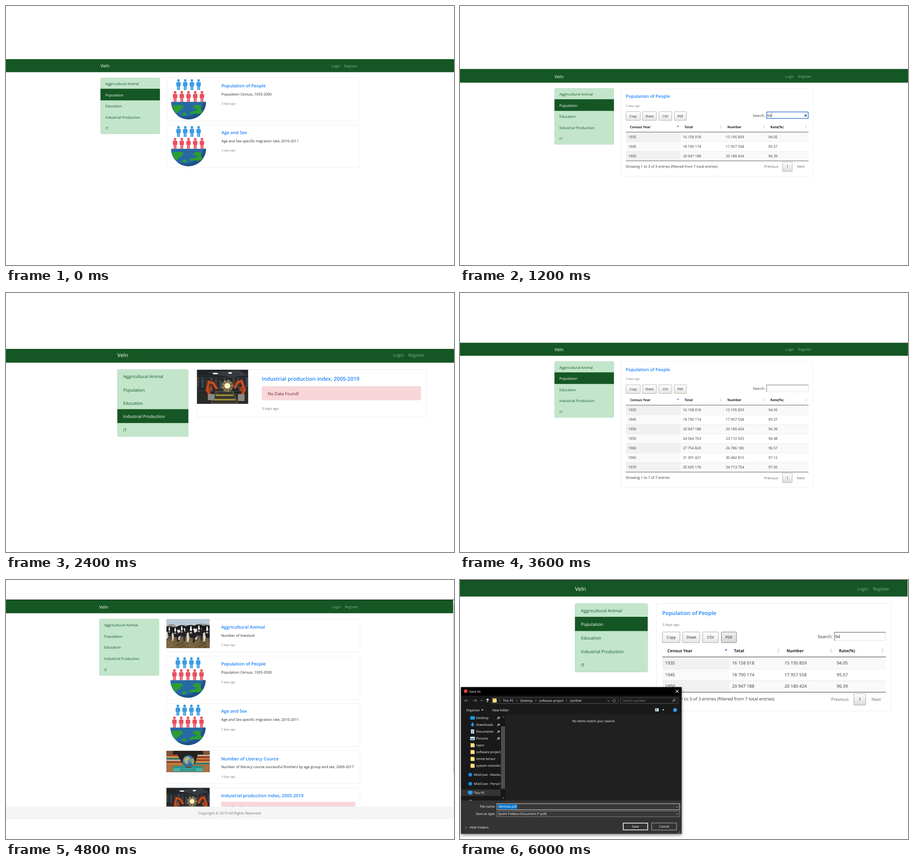
Recreate the animation shown at these times as an HTML page. Size 983 by 570 pixels, loop 7200 ms.

```html
<!DOCTYPE html>
<html lang="en">
<head>
<meta charset="utf-8">
<title>Statistics portal tour</title>
<style>
  html, body { margin: 0; width: 100%; height: 100%; overflow: hidden; background: #fff; }
  svg { display: block; }
  text { font-family: 'Open Sans', 'Noto Sans', sans-serif; white-space: pre; text-rendering: geometricPrecision; }
</style>
</head>
<body>
<svg id="stage" width="983" height="570" viewBox="0 0 983 570"></svg>
<script>
const SCENE_MS = 1200;
const GREEN = '#155724', INK = '#212529', MUTED = '#6c757d', LINK = '#1a80fa';
const BRAND = 'Veln';
const FIT = { 400: .957, 600: .945, 700: .915 };   // evens out width per weight

const rect = (x, y, w, h, fill, extra = '') =>
  `<rect x="${x}" y="${y}" width="${w}" height="${h}" fill="${fill}" ${extra}/>`;
const circle = (x, y, r, fill, extra = '') => `<circle cx="${x}" cy="${y}" r="${r}" fill="${fill}" ${extra}/>`;
const ellipse = (x, y, rx, ry, fill) => `<ellipse cx="${x}" cy="${y}" rx="${rx}" ry="${ry}" fill="${fill}"/>`;
const path = (d, fill, extra = '') => `<path d="${d}" fill="${fill}" ${extra}/>`;
const line = (d, stroke, width = 1) => path(d, 'none', `stroke="${stroke}" stroke-width="${width}"`);
const group = (x, y, content, scale = 1) => `<g transform="translate(${x} ${y}) scale(${scale})">${content}</g>`;
const clip = (x, y, w, h, content) => `<svg x="${x}" y="${y}" width="${w}" height="${h}">${content}</svg>`;
const frame = (x, y, w, h, fill, stroke, radius = 0, width = 1) =>
  rect(x + width / 2, y + width / 2, w - width, h - width, fill,
    `stroke="${stroke}" stroke-width="${width}" rx="${radius}"`);
const repeat = (n, draw) => Array.from({ length: n }, (_, i) => draw(i)).join('');
const text = (x, y, s, { size = 16, fill = INK, weight = 400, anchor = 'start' } = {}) =>
  `<text x="${x}" y="${y}" font-size="${size * FIT[weight]}" font-weight="${weight}" fill="${fill}" text-anchor="${anchor}">${s}</text>`;

// ---- pictures, 184 units wide ----
const person = (x, y, fill) => group(x, y,
  circle(0, 5.5, 5.5, fill) +
  path('M-5 12H5Q9.500 12 9.500 17V30H6V47H.7V32H-.7V47H-6V30H-9.500V17Q-9.500 12-5 12Z', fill));

function globePeople() {
  return group(-1, -1, repeat(4, i => person(49.6 + 28.8 * i, 6, '#3b9be3')) +
    repeat(5, i => person(35 + 28.8 * i, 57, '#e9505f')) +
    group(92.7, 104,
      path('M-75 0H75A75 75 0 0 1-75 0Z', '#2769a3') +
      path('M75 0A75 75 0 0 1-50 56A82 82 0 0 0 64 0Z', '#1f5288') +
      path('M-70 16Q-50 10-24 15Q-18 26-32 29Q-30 38-44 40L-52 50Q-66 38-70 16Z', '#2b9d33') +
      path('M22 16Q38 10 54 16V34Q62 36 58 46Q46 54 28 50L6 52Q4 42 14 40L34 38L38 30L22 28Z', '#2b9d33') +
      path('M-26 50Q-18 44-10 48Q-4 56-12 58Q-24 60-26 50Z', '#2b9d33')));
}

function factory() {
  const robot = d => line(d, '#5e2917', 15) + line(d, '#bd5128', 8);
  return rect(0, 0, 184, 124, '#202326') +
    repeat(8, i => rect(0, 20 + i * 8, 184, 2, i % 2 ? '#3b454d' : '#34302c')) +
    repeat(12, i => rect(i * 16, 26 + i * 5 % 13, 8, 34, i % 2 ? '#344858' : '#433e35')) +
    path('M35 10L150 2L184 20L120 28Z', '#343a40') +
    ellipse(66, 14, 10, 3, '#f7f4e4') + ellipse(119, 12, 7, 3, '#f7f4e4') +
    rect(0, 84, 184, 40, '#2a2a27') + path('M66 76H132L150 124H48Z', '#4b473b') +
    repeat(5, i => line(`M${72 - i * 4} ${84 + i * 8}H${126 + i * 4}`, i % 2 ? '#b39d2d' : '#2b2b27', 4)) +
    robot('M48 94L36 72L43 44L59 49L72 70') + robot('M160 94L171 72L160 41L146 46L135 67') +
    circle(48, 70, 9, '#9b4424') + circle(160, 70, 9, '#9b4424') +
    rect(39, 88, 24, 22, '#888983') + rect(147, 88, 24, 25, '#888983') +
    circle(109, 59, 21, '#f0be6b', 'opacity=".35"') + circle(109, 58, 10, '#fff3c4') +
    repeat(9, i => line(`M109 58l${22 * Math.cos(i * .7)} ${22 * Math.sin(i * .7)}`, '#fff0ba', 1.2));
}

function cows() {
  const cow = (x, y, s) => group(x, y,
    path('M-20 6Q-2-8 23 7L25 38Q18 48 14 46V68H8V47H-9V68H-15V44Q-24 28-20 6Z', '#202126') +
    path('M8 3Q23 5 24 22L14 29L9 17Z', '#e4e2df') +
    path('M-16 31L-9 25L-5 47L-10 64H-15Z', '#d8d3cb') +
    path('M-16 4L-24 9L-20 15L-10 11L-8 28Q0 36 7 28L10 11L19 14L22 8L13 4Q0-3-16 4Z', '#151619') +
    path('M-2 3H2L5 19Q0 24-4 19Z', '#efece6') + ellipse(0, 28, 5, 4, '#a7978c'), s);
  return rect(0, 0, 184, 124, '#b9c8d4') + rect(0, 25, 184, 42, '#dddeda') +
    path('M0 30Q20 12 42 29Q78 20 106 30Q145 11 184 25V66H0Z', '#929791') +
    rect(0, 64, 184, 60, '#655139') + path('M0 87Q90 74 184 87V124H0Z', '#75603f') +
    cow(12, 31, .85) + cow(138, 24, 1) + cow(65, 27, .98) + cow(37, 34, .92) +
    cow(173, 27, 1.1) + cow(104, 26, 1.15) +
    repeat(32, i => ellipse(i * 47 % 184, 94 + i * 17 % 28, 6, 1.5, i % 2 ? '#433821' : '#927d55'));
}

function books() {
  const colours = ['#c4482e', '#e1b14c', '#357f82', '#d6c6a0', '#a83b34', '#d48a35'];
  return rect(0, 0, 184, 92, '#24211f') + rect(0, 56, 184, 36, '#aa7040') +
    repeat(6, i => rect(0, 17 + i * 7, 48 + i * 4, 6, colours[i]) +
      rect(132 - i * 2, 17 + i * 7, 56 + i * 2, 6, colours[(i + 3) % 6])) +
    rect(0, 0, 28, 17, '#805239') + rect(156, 0, 28, 17, '#805239') +
    path('M34 65H148L156 74V89H28V74Z', '#249790') + rect(30, 75, 124, 12, '#48b8a9') +
    text(92, 86, 'EDUCATION', { size: 13, fill: '#196865', weight: 700, anchor: 'middle' }) +
    circle(94, 46, 26, '#336f9e') + circle(88, 39, 17, '#72a6ca', 'opacity=".5"') +
    path('M75 35L87 25L101 30L96 40L88 44L91 54L85 58L77 47Z', '#b3b677') +
    path('M103 36L115 32L119 47L111 60L106 52Z', '#98a466') +
    path('M84 68H104L108 73H80Z', '#6b4a2b');
}

// ---- page parts, in unscaled layout pixels ----
const MENU = ['Aggricultural Animal', 'Population', 'Education', 'Industrial Production', 'IT'];

function sidebar(active) {
  return group(0, 80, frame(0, 0, 255, 242, '#c3e6cb', '#a9c9b0', 4) +
    MENU.map((label, i) => {
      const on = i === active;
      return (on ? rect(0, 48 * i - .7, 255, 50, GREEN) : '') +
        text(21, 48 * i + 31.7, label, { fill: on ? '#fff' : GREEN });
    }).join(''));
}

const navText = () => text(0, 36, BRAND, { size: 20, fill: '#fff' }) +
  text(990, 34.6, 'Login', { fill: '#8aab92' }) + text(1045, 34.6, 'Register', { fill: '#8aab92' });

function page({ x, y, scale, navTop = y, right = 983, active, content }) {
  return rect(0, navTop, right, y + 56 * scale - navTop, GREEN) +
    group(x, y, navText() + sidebar(active) + content, scale);
}

const ago = (x, y) => text(x, y, '3 days ago', { size: 12.8, fill: MUTED });
const heading = (x, s) => text(x, 41.4, s, { size: 20, weight: 600, fill: LINK });

function card(y, height, imageHeight, picture, title, body) {
  const alert = frame(519, 61, 571, 50, '#f8d7da', '#f5c6cb', 4) +
    text(540, 92.6, 'No Data Found!', { fill: '#721c24' });
  return group(0, y, frame(285, 0, 825, height, '#fff', '#dfdfdf', 4) +
    clip(286, 1, 184, imageHeight, picture) + heading(519, title) +
    (body ? text(519, 75.6, body) : alert) + ago(519, body ? 115.6 : 145.6));
}

const peopleCard = y => card(y, 186, 184, globePeople(), 'Population of People', 'Population Census, 1935-2000');
const ageCard = y => card(y, 186, 184, globePeople(), 'Age and Sex', 'Age and Sex specific migration rate, 2010-2011');
const industryCard = y => card(y, 172, 123, factory(), 'Industrial production index, 2005-2019');

const CENSUS = [
  '1935|16 158 018|15 195 859|94.05', '1945|18 790 174|17 957 558|95.57',
  '1950|20 947 188|20 180 424|96.39', '1955|24 064 763|23 172 925|96.48',
  '1960|27 754 820|26 786 180|96.57', '1965|31 391 421|30 482 810|97.12',
  '1970|35 605 176|34 713 754|97.50'].map(row => row.split('|'));
const COLUMNS = [['Census Year', 324, 316, 530], ['Total', 557.5, 551, 714],
  ['Number', 742, 735, 898], ['Rate(%)', 926, 918, 1079]];
const BUTTONS = [['Copy', 306, 63], ['Sheet', 377.3, 61], ['CSV', 447, 57], ['PDF', 513, 54]];

function searchBox(query, focused) {
  const box = focused
    ? frame(909, 100.5, 181, 31, '#fff', '#3f78d2', 1, 3) +
      line('M932 106V126', '#222', 1.5) + line('M1073 113l9 9m0-9l-9 9', '#174d95', 2.6)
    : frame(909, 101, 181, 30, '#fff', '#c9c9c9') + line('M910 131V102H1090', '#777', 2);
  return text(851, 123, 'Search:', { fill: '#333' }) + box + text(912.5, 122.7, query, { fill: '#222' });
}

function censusTable({ rows, query = '', focused, pressed }) {
  const end = 189 + 41 * rows;
  const note = rows < 7 ? ' (filtered from 7 total entries)' : '';
  const buttons = BUTTONS.map(([label, x, w]) => {
    const down = label === pressed;
    return frame(x, 100, w, 39, `url(#${down ? 'pressed' : 'button'})`, down ? '#666' : '#999', 2, 1.4) +
      text(x + w / 2, 124.7, label, { size: 14.08, anchor: 'middle', fill: '#222' });
  }).join('');
  const head = COLUMNS.map(([label, x, , icon], i) =>
    text(x, 171.7, label, { weight: 700 }) +
    (i ? path(`M${icon - 4} 164l4-5 4 5zm0 4h8l-4 5z`, '#d0d0d8') : path(`M${icon - 5} 166l5-7 5 7z`, '#7d7de0'))).join('');
  const body = CENSUS.slice(0, rows).map((row, i) => {
    const y = 189 + 41 * i, odd = i % 2 === 0;
    return rect(306, y, 784, 41, odd ? '#f9f9f9' : '#fff') + rect(306, y, 235, 41, odd ? '#f1f1f1' : '#fafafa') +
      (i ? line(`M306 ${y + .5}H1090`, '#ddd') : '') +
      row.map((value, c) => text(COLUMNS[c][2], y + 26, value, { fill: '#333' })).join('');
  }).join('');
  return group(0, 80, frame(285, 0, 825, 256 + 41 * rows, '#fff', '#dfdfdf', 4) +
    heading(306, 'Population of People') + ago(306, 79.5) + buttons + searchBox(query, focused) + head + body +
    line(`M306 188.500H1090M306 ${end + .5}H1090`, '#222', 1.5) +
    text(306, end + 30, `Showing 1 to ${rows} of ${rows} entries${note}`, { fill: '#333' }) +
    text(899, end + 31, 'Previous', { fill: '#666' }) + text(1040, end + 31, 'Next', { fill: '#666' }) +
    frame(977.5, end + 4.5, 43, 42, 'url(#pager)', '#979797', 2, 1.3) +
    text(999, end + 31, '1', { anchor: 'middle', fill: '#333' }));
}

// ---- dark file dialog, in stage pixels ----
function saveDialog() {
  const label = (x, y, s, fill = '#fff', anchor) => text(x, y, s, { size: 7.45, fill, anchor });
  const folder = (x, y) => rect(x, y - 4.5, 8, 9, '#e8bd4d') + rect(x + 1, y - 3, 8, 7.5, '#ffe08a');
  const chevron = (x, y, dir = 1) => line(`M${x - 2.5} ${y - dir}l2.500 ${2.5 * dir} 2.500 ${-2.5 * dir}`, '#aaa');
  const caret = (x, y) => path(`M${x - 2.5} ${y - 1.2}h5l-2.500 3z`, '#ddd');
  const pin = y => line(`M81.500 ${y + 3}l2.500-2.500m-1-2l3.500 3.500m-2-4.500l3 3`, '#aaa', 1.3);
  const screen = (x, y) => rect(x, y - 4, 10, 7, '#2d9be8') + rect(x + 3, y + 3.5, 4, 1, '#9cd0f3');

  const places = ['Desktop', 'Downloads', 'Documents', 'Pictures', 'rapor', 'software project', 'nöme tensor', 'system resimleri'];
  const icons = [
    y => rect(22.5, y - 3.5, 10, 7.5, '#1c98ec'),
    y => path(`M26 ${y - 4.5}h3v4h3l-4.500 5-4.500-5h3z`, '#3199ea'),
    y => rect(24, y - 4.5, 7, 9, '#dce7ee') + line(`M25.500 ${y - 1.5}h4m-4 2h4m-4 2h4`, '#3b87b8'),
    y => rect(22.5, y - 3.5, 10, 7.5, '#d9edf8') + rect(24, y, 7, 2.5, '#3187bd')];
  const tree = places.map((name, i) => {
    const y = 303.3 + 15.05 * i;
    return (icons[i] ? icons[i](y) + pin(y) : folder(23, y)) + label(35.5, y + 2.6, name);
  }).join('') +
    ['MistCove - Manisa', 'MistCove - Personal'].map((name, i) =>
      circle(22.5, 428.5 + 20 * i, 4, '#1490df') + label(30.5, 431 + 20 * i, name)).join('') +
    rect(2, 461, 87, 14.5, '#333') + screen(17.5, 468) + label(30.5, 471, 'This PC') +
    rect(21, 484, 5, 1.5, '#bbb');

  const crumbs = [['This PC', 94], ['Desktop', 132], ['software project', 173.5], ['içerikler', 241]].map(([name, x]) =>
    line(`M${x - 8.3} 263l2 2.200-2 2.200`, '#aaa', .9) + label(x, 268, name)).join('');

  return rect(2, 235.5, 484.5, 323, '#3c3c3c', 'filter="drop-shadow(0 3px 3px #0007)"') +
    rect(2.5, 254, 483.5, 42, '#191919') + rect(2.5, 295.5, 99, 190, '#191919') +
    rect(2.5, 236, 483.5, 18.5, '#000') + circle(12.5, 244.6, 4.2, '#db4437') + label(20, 247.6, 'Save As') +
    line('M473.500 242l6 6m0-6l-6 6', '#eee', 1.1) +
    line('M18 265.300H10.500l3-3m-3 3l3 3M29 265.300h7.500l-3-3m3 3l-3 3', '#999') +
    chevron(47.5, 265) + line('M60.500 269v-7.500l-3 3m3-3l3 3', '#fff', 1.3) +
    frame(69.5, 258.5, 278, 13.7, '#191919', '#555') + folder(71.5, 265) + crumbs +
    chevron(326, 265.5) + line('M340.500 263.500a3 3 0 1 1-3-1h2.500', '#aaa') +
    frame(352, 258.5, 126.5, 13.7, '#191919', '#555') + label(357.5, 268, 'Search içerikler', '#858585') +
    circle(470, 264.3, 2.3, 'none', 'stroke="#bbb"') + line('M468.300 266l-2.500 2.700', '#bbb') +
    label(13.5, 288.6, 'Organize') + caret(49, 286) + label(71, 288.6, 'New folder') +
    rect(428, 282.5, 8, 6.5, '#e4eef5') + rect(429, 284, 4, 3, '#3d92ca') + caret(446, 286) +
    circle(472, 286, 4.6, '#1780d3') + text(472, 288.6, '?', { size: 7.5, fill: '#fff', weight: 700, anchor: 'middle' }) +
    rect(101.5, 295.5, 384.5, 190, '#202020') + label(293.7, 312.8, 'No items match your search.', '#fff', 'middle') +
    `<svg width="89" height="486">${tree}</svg>` + [0, 1, 2, 3].map(i => pin(303.3 + 15.05 * i)).join('') +
    rect(89.5, 296, 10.5, 189, '#171717') + rect(90, 322, 9, 137.5, '#4d4d4d') + chevron(95, 302, -1) + chevron(95, 479.5) +
    rect(2.5, 485.5, 483.5, 72.5, '#333') +
    label(77.5, 501.2, 'File name:', '#fff', 'end') + label(77.5, 517.2, 'Save as type:', '#fff', 'end') +
    frame(80.5, 491.7, 402, 14.3, '#383838', '#d8d8d8') + rect(83.5, 493.5, 42, 10.5, '#0878d2') +
    label(84, 501.2, BRAND + 'Swe.pdf') + frame(80.5, 508, 402, 13.5, '#383838', '#888') +
    label(83.5, 517.3, 'Quilm Foldara Document (*.pdf)') + chevron(477, 499) + chevron(477, 515) +
    frame(357.5, 534.3, 55, 16.4, '#333', '#fff', 0, 1.5) + label(385, 545, 'Save', '#fff', 'middle') +
    frame(420, 534.3, 55.5, 16.4, '#333', '#bbb') + label(447.7, 545, 'Cancel', '#fff', 'middle') +
    chevron(13.5, 545, -1) + label(21, 547.4, 'Hide Folders') +
    repeat(3, i => repeat(i + 1, j => rect(482.5 - 2 * j, 552 + 2 * i, 1, 1, '#aaa')));
}

function homeScene() {
  const cards = group(0, 80,
    card(0, 142, 124, cows(), 'Aggricultural Animal', 'Number of livestock') +
    peopleCard(158) + ageCard(360) +
    card(562, 142, 91, books(), 'Number of Literacy Cource', 'Number of literacy course successful finishers by age group and sex, 2009-2017') +
    industryCard(720));
  return clip(0, 0, 983, 526.5,
    page({ x: 204.6, y: 44.3, scale: .5155, navTop: 43, right: 981, content: cards }) +
    rect(0, 43, 983, 1, '#18251c') + rect(981, 44, 2, 483, '#f1f1f1') + rect(981.5, 53, 1.5, 371, '#c1c1c1') +
    rect(0, 498.7, 981, 28, '#f5f5f5') +
    text(490.5, 516.3, 'Copyright © 2019 All Rights Reserved', { size: 8.35, fill: MUTED, anchor: 'middle' }));
}

const mid = { x: 207.3, scale: .5115 };
const scenes = [
  page({ ...mid, y: 117, active: 1, content: peopleCard(80) + ageCard(281.6) }),
  page({ ...mid, y: 140.1, navTop: 138.6, active: 1, content: censusTable({ rows: 3, query: '94', focused: true }) }),
  page({ x: 244.3, y: 119.2, scale: .611, navTop: 123, active: 3, content: industryCard(80) }),
  page({ ...mid, y: 109.5, active: 1, content: censusTable({ rows: 7 }) }),
  homeScene(),
  page({ x: 252.3, y: 1.4, scale: .6255, navTop: 0, right: 982, active: 1,
    content: censusTable({ rows: 3, query: '94', pressed: 'PDF' }) }) +
    rect(0, 0, 982, 1, '#18251c') + saveDialog()
];

const gradient = (id, from, to) => `<linearGradient id="${id}" x2="0" y2="1">
  <stop stop-color="${from}"/><stop offset="1" stop-color="${to}"/></linearGradient>`;
const stage = document.getElementById('stage');
stage.innerHTML = `<defs>${gradient('button', '#fff', '#e6e6e6')}${gradient('pressed', '#f0f0f0', '#d8d8d8')}` +
  `${gradient('pager', '#fff', '#dcdcdc')}</defs>` + scenes.map(s => `<g class="scene">${s}</g>`).join('');
const layers = [...stage.querySelectorAll('.scene')];

function render() {
  const current = Math.floor(performance.now() / SCENE_MS) % layers.length;
  layers.forEach((layer, i) => { layer.style.display = i === current ? '' : 'none'; });
  requestAnimationFrame(render);
}
render();
</script>
</body>
</html>
```
